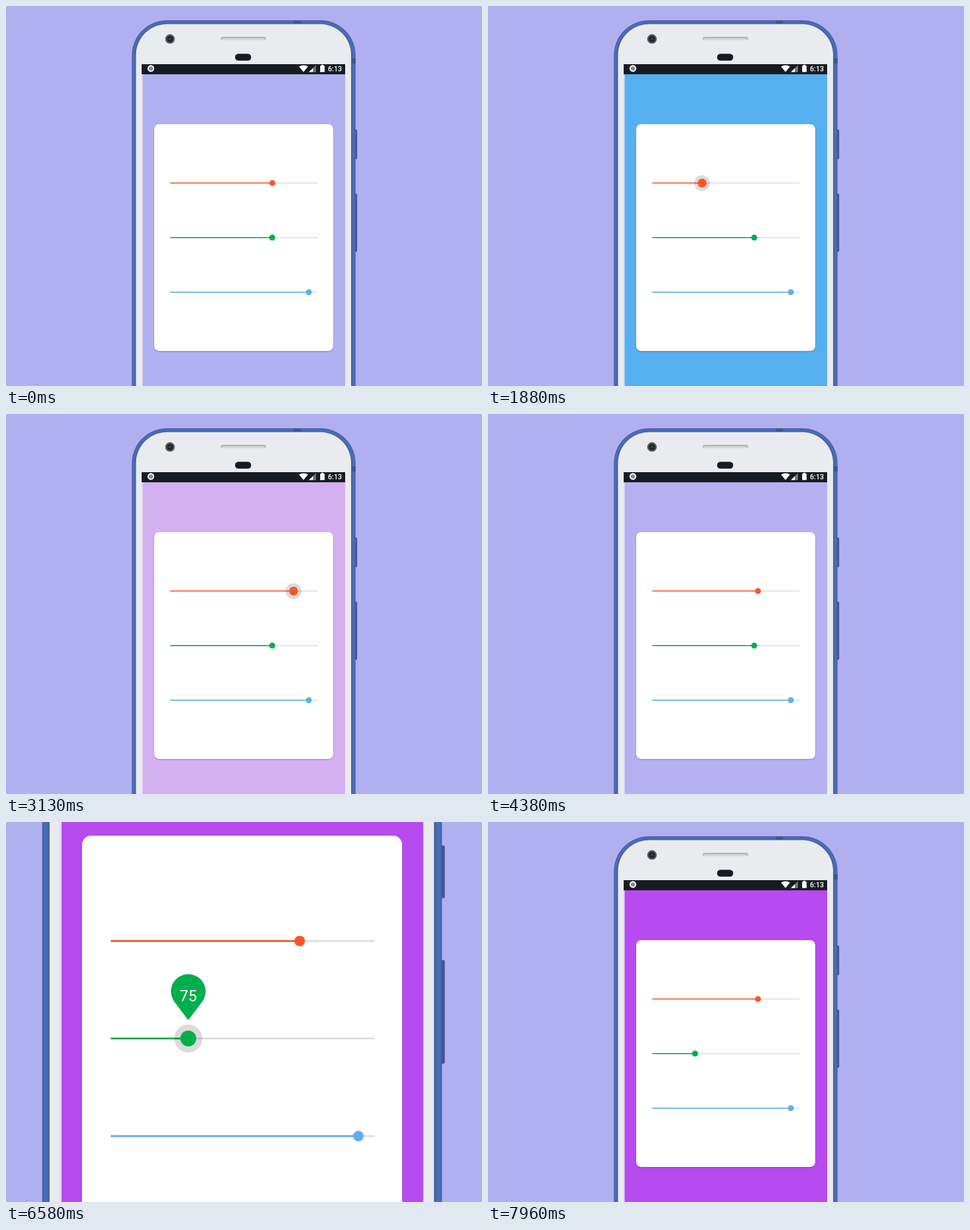
Write an HTML page that moves like this. It is 800x640 px and loops after 8 s.

```html
<!DOCTYPE html>
<html lang="en">
<head>
<meta charset="utf-8">
<title>Colour sliders</title>
<style>
  html, body { margin: 0; width: 100%; height: 100%; overflow: hidden; background: #b0b0f0; }
  svg { display: block; width: 800px; height: 640px; }
  text { font-family: Roboto, sans-serif; fill: #fff; }
</style>
</head>
<body>
<svg viewBox="0 0 800 640">
  <defs>
    <filter id="shadow" x="-10%" y="-10%" width="120%" height="120%">
      <feDropShadow dx="0" dy="1" stdDeviation="1" flood-color="#303050" flood-opacity=".4"/>
    </filter>
  </defs>
  <g id="scene">
    <g fill="#435590">
      <rect x="584" y="208" width="6.2" height="50" rx="2"/>
      <rect x="584" y="316" width="6.2" height="98" rx="2"/>
    </g>
    <rect x="211.5" y="24" width="376" height="760" rx="59" fill="#4a62a8"/>
    <rect x="213" y="25.6" width="373" height="757" rx="57.5" fill="#4a6cb8"/>
    <rect x="216.5" y="29" width="365.5" height="750" rx="54" fill="#49619a"/>
    <rect x="218.5" y="30.5" width="361.5" height="747" rx="52" fill="#e9ebee"/>
    <rect x="484" y="24" width="12" height="6" fill="#40588e"/>
    <rect x="580.5" y="88" width="7" height="9" fill="#40588e"/>

    <circle cx="275.6" cy="55.6" r="8" fill="#565a60"/>
    <circle cx="275.6" cy="55.6" r="5.4" fill="#20242a"/>
    <circle cx="275.6" cy="55.6" r="2" fill="#41464c"/>
    <rect x="361" y="52" width="76" height="5.5" rx="2.5" fill="#d5d5d8"/>
    <path d="M362 56.5V55Q362 53 364 53H433Q436 53 436 55V56.5" fill="none" stroke="#b0b0b4" stroke-width="2"/>
    <rect x="385" y="80.5" width="27" height="11.5" rx="5.5" fill="#181b24"/>

    <rect id="screen" x="228.3" y="98" width="341.7" height="680"/>
    <rect x="228.3" y="115" width="1.4" height="663" fill="#e4e5fa"/>
    <rect x="228" y="98" width="342" height="17" fill="#161c22"/>
    <circle cx="243.5" cy="105.3" r="4.6" fill="#858a90" stroke="#fff" stroke-width="2.2"/>
    <path d="M492.5 102Q500 97.5 507.5 102L500 111.3Z" fill="#fff"/>
    <path d="M509 111.2H521V99.5Z" fill="#70757b"/>
    <path d="M509 111.2H516V104.4Z" fill="#fff"/>
    <path d="M528 100.5H530V99H533.5V100.5H535.5V111.3H528Z" fill="#fff"/>
    <text x="541" y="110" font-size="12" font-weight="500">6:13</text>

    <rect x="249" y="199" width="301" height="382" rx="8.5" fill="#fff" filter="url(#shadow)"/>
    <g id="sliders"></g>
  </g>
</svg>
<script>
const LOOP = 8000, TRACK_LEFT = 276, TRACK_WIDTH = 248, ZOOM = 1.787;
const svgNS = 'http://www.w3.org/2000/svg';
const scene = document.getElementById('scene');
const screenRect = document.getElementById('screen');

const clamp = x => Math.max(0, Math.min(1, x));
const smooth = x => x * x * (3 - 2 * x);
const ramp = (t, from, to) => smooth(clamp((t - from) / (to - from)));

// Harmonic mean of the neighbouring slopes; zero at turning points and ends.
function tangent(keys, i) {
  if (i === 0 || i === keys.length - 1) return 0;
  const slope = j => (keys[j + 1][1] - keys[j][1]) / (keys[j + 1][0] - keys[j][0]);
  const before = slope(i - 1), after = slope(i);
  return before * after > 0 ? 2 * before * after / (before + after) : 0;
}

// Smooth curve through [time, value] keys, without overshoot.
function track(t, keys) {
  if (t <= keys[0][0]) return keys[0][1];
  const i = keys.findIndex(key => key[0] > t) - 1;
  if (i < 0) return keys[keys.length - 1][1];
  const [t0, v0] = keys[i], [t1, v1] = keys[i + 1];
  const span = t1 - t0, u = (t - t0) / span;
  return v0 + (v1 - v0) * smooth(u)
    + span * u * (1 - u) * ((1 - u) * tangent(keys, i) - u * tangent(keys, i + 1));
}

function add(parent, tag, attrs) {
  const node = document.createElementNS(svgNS, tag);
  for (const name in attrs) node.setAttribute(name, attrs[name]);
  return parent.appendChild(node);
}

function makeSlider(y, color) {
  const group = add(document.getElementById('sliders'), 'g', { transform: `translate(${TRACK_LEFT} ${y})` });
  add(group, 'rect', { y: -.85, width: TRACK_WIDTH, height: 1.7, fill: '#dedede' });
  const active = add(group, 'rect', { y: -.85, height: 1.7, fill: color });
  const handle = add(group, 'g', {});
  const halo = add(handle, 'circle', { fill: '#000' });
  const thumb = add(handle, 'circle', { fill: color });
  const balloon = add(handle, 'g', {});
  add(balloon, 'path', { d: 'M0 -17.3L-13.2 -34.8A16.3 16.3 0 1 1 13.2 -34.8Z', fill: color });
  const label = add(balloon, 'text', { y: -35.2, 'font-size': 14.6, 'text-anchor': 'middle' });

  return (value, press, showLabel) => {
    const x = value / 255 * TRACK_WIDTH;
    active.setAttribute('width', x);
    handle.setAttribute('transform', `translate(${x} 0)`);
    thumb.setAttribute('r', 5 + 2.5 * clamp(press * 2));
    halo.setAttribute('r', 13.2 * press);
    halo.setAttribute('opacity', .14 * press);
    balloon.setAttribute('transform', `scale(${showLabel ? press : 0})`);
    label.textContent = Math.round(value);
  };
}

const setRed = makeSlider(298.2, '#fa5528');
const setGreen = makeSlider(390.1, '#00ae4c');
const setBlue = makeSlider(482.1, '#60aeea');

const redKeys = [[980, 176.5], [1080, 105], [1500, 55], [2420, 164], [3000, 215], [3900, 182.7]];
const greenKeys = [[5600, 176.3], [5790, 175], [6580, 75], [6700, 74]];

function draw(t) {
  const red = track(t, redKeys), green = track(t, greenKeys), blue = 239.5;
  setRed(red, ramp(t, 990, 1110) - ramp(t, 4100, 4220), false);
  setGreen(green, ramp(t, 5600, 5720) - ramp(t, 6800, 6920), true);
  setBlue(blue, 0, false);
  screenRect.setAttribute('fill', `rgb(${red}, ${green}, ${blue})`);

  const scale = 1 + (ZOOM - 1) * (ramp(t, 5180, 5580) - ramp(t, 7560, 7940));
  scene.setAttribute('transform', `translate(403 422.5) scale(${scale}) translate(-403 -422.5)`);
}

const start = performance.now();
function tick() {
  draw((performance.now() - start) % LOOP);
  requestAnimationFrame(tick);
}
tick();
</script>
</body>
</html>
```
